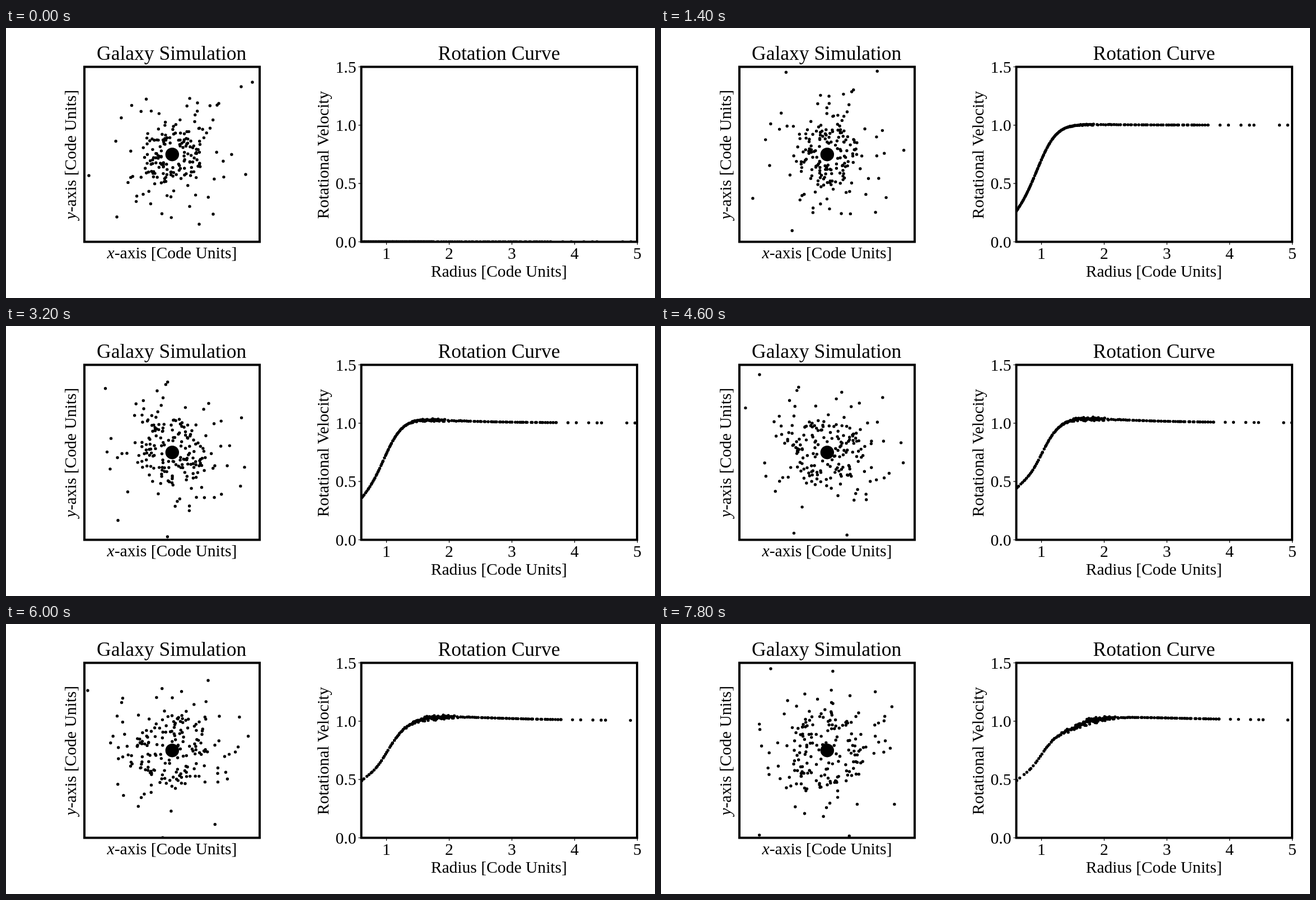
An HTML page that plays this animation: 1159x483 px, repeating every 8 s.

```html
<!DOCTYPE html>
<html lang="en">
<head>
<meta charset="utf-8">
<title>Galaxy Simulation</title>
<style>
  html, body { margin: 0; width: 100%; height: 100%; overflow: hidden; background: #fff; }
  svg { display: block; }
  text { font: 29.6px "Liberation Serif", "Times New Roman", serif; text-anchor: middle; }
  .title { font-size: 35.5px; }
  .end { text-anchor: end; }
  .dots { fill: none; stroke: #000; stroke-width: 5.4; stroke-linecap: round; }
  .frame { fill: none; stroke: #000; stroke-width: 4; }
  .ticks { stroke: #000; stroke-width: 1.2; }
</style>
</head>
<body>
<svg width="1159" height="483" viewBox="0 0 1159 483">
  <clipPath id="skyClip"><rect x="140" y="69.5" width="313" height="313"/></clipPath>
  <clipPath id="plotClip"><rect x="634.5" y="69.5" width="492.5" height="313"/></clipPath>

  <path id="sky" class="dots" clip-path="url(#skyClip)"/>
  <circle cx="296.8" cy="226.2" r="12.2"/>
  <rect class="frame" x="140" y="69.5" width="313" height="313"/>
  <text class="title" x="295.7" y="57">Galaxy Simulation</text>
  <text x="296.5" y="412"><tspan font-style="italic">x</tspan>-axis [Code Units]</text>
  <text transform="translate(125.3 226.5) rotate(-90)"><tspan font-style="italic">y</tspan>-axis [Code Units]</text>

  <path id="plot" class="dots" clip-path="url(#plotClip)"/>
  <path id="ticks" class="ticks"/>
  <rect class="frame" x="634.5" y="69.5" width="492.5" height="313"/>
  <text class="title" x="880.5" y="57">Rotation Curve</text>
  <text x="880.3" y="445">Radius [Code Units]</text>
  <text transform="translate(576 227) rotate(-90)">Rotational Velocity</text>
  <g id="labels"></g>
</svg>
<script>
const $ = id => document.getElementById(id);
const CX = 296.5, CY = 226, UNIT = 31.3;
const STEPS = 40, STEP_MS = 200, DT = 0.2;
const plotX = r => 679.5 + (r - 1) * 112;
const plotY = v => 382.5 - v * 208.67;
const bell = (r, mid, width) => Math.exp(-(((r - mid) / width) ** 2));

let seed = 11;
function random() {
  seed = (seed + 0x6D2B79F5) | 0;
  let t = Math.imul(seed ^ (seed >>> 15), 1 | seed);
  t = (t + Math.imul(t ^ (t >>> 7), 61 | t)) ^ t;
  return ((t ^ (t >>> 14)) >>> 0) / 4294967296;
}

const stars = [];
const addStar = (r, angle) => stars.push({ r, angle, noise: random() + random() - 1 });

// Spread stars evenly in radius, at random angles
function addDisc(count, from, to) {
  for (let i = 0; i < count; i++)
    addStar(from + (to - from) * (i + random()) / count, 2 * Math.PI * random());
}
addDisc(134, 0.62, 1.75);
addDisc(52, 1.75, 3.65);

// The far stars, by their starting places on the stage
for (const [x, y] of [[440, 97], [420, 105], [265, 66], [310, 45], [120, 156],
  [148, 264], [428, 262], [198, 338], [345, 351], [370, 333], [380, 135], [377, 138]])
  addStar(Math.hypot(x - CX, y - CY) / UNIT, Math.atan2(CY - y, x - CX));

// Rotation speed: a rising halo curve, a faster centre and a crest that moves outward
function speed(r, k, noise) {
  const halo = 1 / Math.sqrt(1 + Math.exp(-7 * (r - 1.02)));
  const centre = 0.27 * Math.sin(Math.PI / 2 * Math.min(1, k / 32)) ** 2 * bell(r, 0.55, 0.35);
  const phase = Math.min(2 * Math.PI, Math.PI * k / (14 * r));
  const crest = 0.085 * r ** 3 / (r ** 4 + 1.5) * (1 - Math.cos(phase)) / 2;
  const dip = 0.055 * Math.max(0, (k - 24) / 15) ** 2 * bell(r, 1.35, 0.35);
  const scatter = 0.035 * noise * k / STEPS * bell(r, 1.75, 0.4);
  return halo + centre + crest - dip + scatter;
}

// Stars drift outward along their tangents; the innermost sink
function advance(k) {
  for (const s of stars) {
    const v = speed(s.r, k, s.noise);
    s.angle += v * DT / s.r;
    s.r += v * v * DT * DT / (2 * s.r) - 0.012 * bell(s.r, 0.45, 0.25);
  }
}

const dot = (x, y) => `M${x.toFixed(2)} ${y.toFixed(2)}h.01`;
const frames = [];
for (let k = 0; k < STEPS; k++) {
  if (k) advance(k);
  frames.push({
    sky: stars.map(s => dot(CX + s.r * UNIT * Math.cos(s.angle),
      CY - s.r * UNIT * Math.sin(s.angle))).join(""),
    // Speeds are not measured yet at the first step
    plot: stars.map(s => dot(plotX(s.r), plotY(k && speed(s.r, k, s.noise)))).join("")
  });
}

let ticks = "", labels = "";
for (let r = 1; r <= 5; r++) {
  ticks += `M${plotX(r)} 382.5v5.2`;
  labels += `<text x="${plotX(r)}" y="413">${r}</text>`;
}
for (let v = 0; v <= 1.5; v += 0.5) {
  ticks += `M634.5 ${plotY(v)}h-5.2`;
  labels += `<text class="end" x="625.5" y="${plotY(v) + 10.3}">${v.toFixed(1)}</text>`;
}
$("ticks").setAttribute("d", ticks);
$("labels").innerHTML = labels;

let shown = -1;
function draw() {
  const k = Math.floor(performance.now() / STEP_MS) % STEPS;
  if (k !== shown) {
    shown = k;
    $("sky").setAttribute("d", frames[k].sky);
    $("plot").setAttribute("d", frames[k].plot);
  }
  requestAnimationFrame(draw);
}
draw();
</script>
</body>
</html>
```
